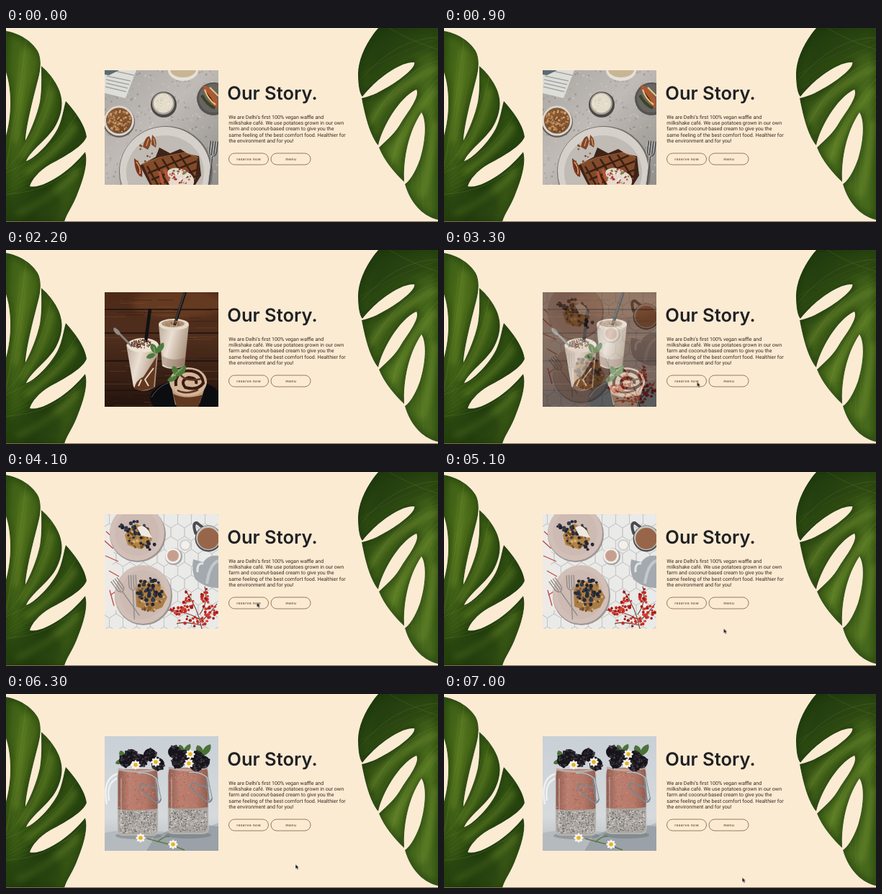
Write an HTML page that moves like this. It is 600 by 271 pixels and loops after 7100 ms.

```html
<!DOCTYPE html>
<html lang="en">
<head>
<meta charset="utf-8">
<title>Our Story</title>
<style>
html, body { margin: 0; width: 100%; height: 100%; overflow: hidden; background: #fcebd3; }
svg { display: block; width: 100vw; height: 100vh; }
text { text-rendering: geometricPrecision; }
.title { font: 600 25.5px Inter, sans-serif; fill: #1f2124; }
.copy { font: 7.1px Roboto, sans-serif; fill: #33291f; }
.btn rect { fill: none; stroke: #8c6f52; stroke-width: .9; }
.btn text { font: 600 5.1px Inter, sans-serif; letter-spacing: .3px; fill: #72583f; text-anchor: middle; }
.slide { opacity: 0; animation: 7.1s linear infinite both; }
#shakes { animation-name: fade1; }
#brunch { animation-name: fade2; }
#jars { animation-name: fade3; }
#cursor { animation: move 7.1s ease-in-out infinite both; }
@keyframes fade1 { 0%, 14.79% { opacity: 0 } 24.65%, 100% { opacity: 1 } }
@keyframes fade2 { 0%, 42.96% { opacity: 0 } 52.82%, 100% { opacity: 1 } }
@keyframes fade3 { 0%, 71.83% { opacity: 0 } 81.69%, 100% { opacity: 1 } }
@keyframes move {
  0%, 35.2% { transform: translate(372px, 275px) }
  43.6%, 46.5% { transform: translate(351.5px, 184.5px) }
  54%, 62% { transform: translate(348.5px, 182.5px) }
  74%, 81% { transform: translate(391.3px, 221.3px) }
  97%, 100% { transform: translate(414.2px, 256.4px) }
}
</style>
</head>
<body>
<svg viewBox="0 0 600 271" preserveAspectRatio="none">
<defs>
  <clipPath id="frame"><rect x="137" y="59" width="158" height="160"/></clipPath>
  <linearGradient id="greenL" x1="0" y1="0" x2=".7" y2="1">
    <stop offset="0" stop-color="#3d5f17"/><stop offset=".3" stop-color="#4a6b19"/>
    <stop offset=".6" stop-color="#365613"/><stop offset=".8" stop-color="#294710"/><stop offset="1" stop-color="#3d5c17"/>
  </linearGradient>
  <linearGradient id="greenR" x1=".2" y1="0" x2=".7" y2="1">
    <stop offset="0" stop-color="#233f10"/><stop offset=".3" stop-color="#365415"/>
    <stop offset=".6" stop-color="#4e701e"/><stop offset="1" stop-color="#47691d"/>
  </linearGradient>
  <linearGradient id="wood" x1="0" y1="0" x2="0" y2="1">
    <stop offset="0" stop-color="#4d2a18"/><stop offset=".4" stop-color="#4f2e1d"/><stop offset="1" stop-color="#25140e"/>
  </linearGradient>
  <linearGradient id="stone" x1="0" y1="0" x2="1" y2="1">
    <stop offset="0" stop-color="#aaa6a2"/><stop offset=".45" stop-color="#c0bbb6"/><stop offset="1" stop-color="#928e8a"/>
  </linearGradient>
  <linearGradient id="mist" x1="0" y1="0" x2="0" y2="1">
    <stop offset="0" stop-color="#c9d0d6"/><stop offset=".7" stop-color="#d6dadd"/><stop offset="1" stop-color="#b4b9be"/>
  </linearGradient>
  <linearGradient id="pink">
    <stop offset="0" stop-color="#8d5c50"/><stop offset=".3" stop-color="#bd8070"/><stop offset=".7" stop-color="#b57868"/><stop offset="1" stop-color="#925d50"/>
  </linearGradient>
  <linearGradient id="milk" x1="0" y1="0" x2="1" y2=".4">
    <stop offset="0" stop-color="#b9a999"/><stop offset=".45" stop-color="#ebe0d3"/><stop offset="1" stop-color="#a8917c"/>
  </linearGradient>
  <filter id="soft"><feGaussianBlur stdDeviation="4"/></filter>
  <path id="leafL" d="M0 4C18 7 36 18 44 32C50 43 48 58 45 70C40 90 28 135 27 157C34 144 43 122 47 103C50 86 49 68 49 53C62 64 75 82 77 98C79 110 76 124 68 138C58 155 35 170 28 186C40 182 62 160 72 140C78 128 80 112 83 102C95 115 110 135 112 152C108 164 85 178 62 190C45 200 36 212 33 221C45 224 62 214 76 205C90 195 100 185 110 173C115 190 106 215 98 235C92 250 84 260 81 271H0V150C7 125 9 90 0 62Z"/>
  <path id="leafR" d="M517 0C501 18 488 45 489 66C489 80 491 92 495 96C510 76 545 47 567 48C570 55 545 75 522 87C510 94 500 97 494 98C498 120 505 150 517 164C522 140 545 98 570 86C575 95 560 115 550 130C540 148 530 155 518 167C525 185 540 203 553 215C552 190 556 150 577 118C585 130 582 160 575 183C568 203 560 214 554 218C560 240 575 262 600 268V0Z"/>
  <clipPath id="clipL"><use href="#leafL"/></clipPath>
  <clipPath id="clipR"><use href="#leafR"/></clipPath>
  <path id="mint" d="M0 0C-6-3-9-9-5-13C1-12 3-6 0 0C0-8 4-13 10-14C12-8 8-2 0 0C-5-2-11 0-12 5C-7 8-2 5 0 0"/>
  <g id="daisy">
    <g fill="#f8f5ec">
      <ellipse rx="2.3" ry="6.8"/><ellipse rx="2.3" ry="6.8" transform="rotate(45)"/>
      <ellipse rx="2.3" ry="6.8" transform="rotate(90)"/><ellipse rx="2.3" ry="6.8" transform="rotate(135)"/>
    </g>
    <circle r="2.8" fill="#e5b423"/>
  </g>
  <g id="jar">
    <path d="M3 7Q1 13 1 20V91Q1 99 9 99H49Q57 99 57 91V20Q57 13 55 7Z" fill="url(#pink)"/>
    <path d="M1 63Q28 66 57 62V91Q57 99 49 99H9Q1 99 1 91Z" fill="#aaa5a0"/>
    <path d="M3 6Q0 13 1 22V91Q1 99 9 99H49Q57 99 57 91V22Q58 13 55 6" fill="none" stroke="#c9c9c6" stroke-width="1.4" opacity=".7"/>
    <path d="M2 7Q29 14 56 7" fill="none" stroke="#b9a9a2" stroke-width="3"/>
    <path d="M6 20V90" stroke="#fff" stroke-width="2" opacity=".25"/>
  </g>
  <path id="clip" d="M0 2Q14 0 25 9L31 38Q29 46 22 41L3 24Q0 19 5 16L26 23M23 7L27 41" fill="none" stroke="#7f858a" stroke-width="2"/>
  <path id="shine" d="M0 2Q14 0 25 9L31 38" fill="none" stroke="#e8eaeb" stroke-width=".8"/>
  <path id="fork" d="M-5-16V-2Q-5 4 0 5Q5 4 5-2V-16M-1.7-16V3M1.7-16V3M0 4V46" fill="none"/>
</defs>

<rect width="600" height="271" fill="#fcebd3"/>

<g clip-path="url(#clipL)">
  <use href="#leafL" fill="url(#greenL)"/>
  <use href="#leafL" fill="none" stroke="#172e09" stroke-width="7" opacity=".6" filter="url(#soft)"/>
  <g fill="none" stroke="#7f9c35" stroke-width="7" opacity=".45" filter="url(#soft)">
    <path d="M14 160Q20 90 27 30M22 182Q55 130 63 85M28 203Q80 165 96 135M15 260Q70 235 100 198"/>
  </g>
  <path d="M0 240Q50 200 70 230T60 275H0Z" fill="#1d360c" opacity=".4" filter="url(#soft)"/>
  <g id="veinsL" fill="none" stroke="#8fa64a" stroke-width=".6" opacity=".35">
    <path d="M0 195Q20 90 28 14M0 198Q50 145 63 67M0 202Q68 175 98 121M0 232Q65 230 110 180"/>
  </g>
</g>
<g clip-path="url(#clipR)">
  <use href="#leafR" fill="url(#greenR)"/>
  <use href="#leafR" fill="none" stroke="#172e09" stroke-width="7" opacity=".6" filter="url(#soft)"/>
  <g fill="none" stroke="#86a33b" stroke-width="7" opacity=".45" filter="url(#soft)">
    <path d="M600 55Q535 80 506 132M597 85Q555 130 537 185M595 130Q590 190 578 235"/>
  </g>
  <path d="M517 0L600 0V35Q545 30 500 70Z" fill="#1b330b" opacity=".35" filter="url(#soft)"/>
  <g id="veinsR" fill="none" stroke="#95ab52" stroke-width=".6" opacity=".3">
    <path d="M600 13Q540 15 493 72M600 45Q540 65 505 138M600 72Q550 120 535 193M532 0Q566 20 600 30"/>
  </g>
</g>

<g clip-path="url(#frame)">
  <g id="waffle">
    <rect x="137" y="59" width="158" height="160" fill="url(#stone)"/>
    <g id="specks" opacity=".4"></g>
    <path d="M137 59H181L166 98L137 91Z" fill="#deded9"/>
    <path d="M140 67L173 74M139 72L171 79M139 77L169 84M138 82L167 89M146 59L178 66" stroke="#a3a5a4" stroke-width="1.3"/>
    <path d="M137 59H157L143 66L137 65Z" fill="#5c6a72"/>
    <ellipse cx="246" cy="59" rx="21" ry="15" fill="#e5e1d9"/><ellipse cx="246" cy="58" rx="18" ry="11" fill="#c8b593"/>
    <circle cx="288" cy="99" r="23" fill="#555453"/><circle cx="288" cy="98" r="20" fill="#68645f"/>
    <path d="M273 80Q284 81 294 100V112Q278 102 273 80" fill="#b0582f"/>
    <path d="M276 86Q280 99 291 107M283 83L295 95" stroke="#e2c583" stroke-width="2.2"/>
    <path d="M272 94Q279 107 290 112" fill="none" stroke="#39442a" stroke-width="4"/>
    <circle cx="219" cy="107" r="18" fill="#4a4847"/><circle cx="218.5" cy="105.5" r="15.5" fill="#a9a296"/><circle cx="218.5" cy="105" r="13.5" fill="#e4dccb"/>
    <circle cx="157" cy="131" r="22" fill="#625d58"/><circle cx="157" cy="129.5" r="21" fill="#dad5cd"/><circle cx="157" cy="129.5" r="18" fill="#7d5433"/>
    <g id="nuts"></g>
    <ellipse cx="222" cy="201" rx="65" ry="64" fill="#716d69"/><ellipse cx="221" cy="200" rx="63" ry="62" fill="#d5d0c9"/>
    <ellipse cx="221" cy="202" rx="54" ry="52" fill="#c0bbb4"/>
    <g id="crumbs"></g>
    <path d="M186 192L208 180L213 167L228 175L242 169L253 176L268 179L271 206L263 219H200Z" fill="#3f2317"/>
    <path d="M190 190L213 182L248 175L266 181L263 211L244 219H203Z" fill="#824b2a"/>
    <path d="M196 193L211 219M206 187L225 219M217 183L240 219M229 179L251 215M241 177L262 209M197 203L257 178M202 212L265 186M214 218L265 198M233 219L264 207" stroke="#3b2015" stroke-width="2.5"/>
    <path d="M189 190L213 181L248 174L267 181" fill="none" stroke="#ad6d3c" stroke-width="1.2"/>
    <path d="M225 199Q234 192 249 199Q265 208 260 219H227Q222 207 225 199" fill="#e6d9cc"/>
    <g id="topping"></g>
    <path d="M178 182Q191 191 189 208Q179 206 178 182" fill="#7a3324"/><path d="M181 187Q187 195 186 204" stroke="#cf9350" stroke-width="2"/>
    <path d="M190 166Q193 152 199 151Q204 160 197 170M203 149Q211 156 208 167L202 163" fill="#83442a"/>
    <path d="M195 165L198 155M205 154L207 164" stroke="#cf9c58" stroke-width="1.4"/>
    <path d="M213 200L218 218M220 197L226 214" stroke="#b5563a" stroke-width="4"/>
    <use href="#fork" transform="translate(287 174) rotate(7)" stroke="#4c4d50" stroke-width="2.2"/>
    <use href="#fork" transform="translate(286 174) rotate(7)" stroke="#c9c7c2" stroke-width=".9"/>
  </g>

  <g id="shakes" class="slide">
    <rect x="137" y="59" width="158" height="160" fill="url(#wood)"/>
    <ellipse cx="240" cy="75" rx="65" ry="20" fill="#87512d" opacity=".4" filter="url(#soft)"/>
    <g id="grain"></g>
    <path d="M137 83H295M137 116H295M137 155H295M137 196H295" stroke="#1d100c" stroke-width="1.5"/>
    <ellipse cx="249" cy="207" rx="49" ry="26" fill="#0c0d10"/><path d="M202 206Q216 181 249 182" fill="none" stroke="#54565a"/>
    <path d="M212 104L217 162Q230 170 248 162L254 104Z" fill="url(#milk)"/>
    <path d="M213 115L217 160Q231 168 248 161L249 150Q233 157 217 148Z" fill="#816250" opacity=".4"/>
    <ellipse cx="233" cy="104" rx="21" ry="8" fill="#e5d9cb"/><ellipse cx="232" cy="103" rx="16" ry="5" fill="#b4977a"/>
    <path d="M249 59L234 105" stroke="#171719" stroke-width="4"/><path d="M248 60L234 103" stroke="#78716a" stroke-width=".7"/>
    <path d="M167 132L177 191Q190 202 207 191L212 132Z" fill="url(#milk)"/>
    <path d="M209 149Q198 166 191 177Q180 182 178 194Q190 199 205 192Z" fill="#633821"/>
    <path d="M205 165L193 181L198 190M188 181L184 190" fill="none" stroke="#e5d4bf" stroke-width="2"/>
    <ellipse cx="190" cy="133" rx="22" ry="10" fill="#ede2d4"/>
    <path d="M150 109L175 135" stroke="#85817b" stroke-width="3"/><ellipse cx="154" cy="114" rx="3" ry="6" transform="rotate(-43 154 114)" fill="#918c85"/>
    <path d="M200 82L194 129" stroke="#111113" stroke-width="4.5"/>
    <g id="cocoa"></g>
    <path d="M228 183L235 216Q253 223 269 214L279 184Z" fill="#bf9e7d"/>
    <path d="M232 201L237 219H267L273 202Q250 210 232 201" fill="#613720"/>
    <ellipse cx="253" cy="184" rx="26" ry="20" fill="#d3b698"/>
    <path d="M236 190Q234 173 249 169Q272 167 274 186Q266 197 249 192Q241 182 254 178Q266 179 264 187" fill="none" stroke="#3b1c13" stroke-width="4"/>
    <path d="M242 174Q250 185 271 180M238 196Q250 203 267 195" fill="none" stroke="#5d3421" stroke-width="2.5"/>
    <g fill="#4e7b3e"><use href="#mint" transform="translate(208 145) scale(1.1)"/><use href="#mint" transform="translate(238 177) scale(1.15)"/></g>
    <path d="M205 135L208 148M230 178L246 164" stroke="#86a667" stroke-width="1.3"/>
  </g>

  <g id="brunch" class="slide">
    <rect x="137" y="59" width="158" height="160" fill="#eaeae8"/>
    <g id="tiles" fill="none" stroke="#bfc0bf" stroke-width=".7"></g>
    <path d="M137 77L151 88L148 130L166 147L157 192L137 197Z" fill="#eeeae6"/>
    <path d="M139 83L151 94M137 96L149 107M138 117L156 125M143 138L157 146M145 172L158 163M150 187L144 165" stroke="#b84b48" stroke-width="1.3"/>
    <ellipse cx="183" cy="87" rx="39" ry="39" fill="#9d9694"/><ellipse cx="182" cy="85" rx="38" ry="39" fill="#d2c0b8"/><ellipse cx="182" cy="85" rx="31" ry="32" fill="#cdbab2"/>
    <ellipse cx="191" cy="173" rx="40" ry="41" fill="#9d9694"/><ellipse cx="190" cy="171" rx="39" ry="41" fill="#d2c0b8"/><ellipse cx="190" cy="171" rx="32" ry="34" fill="#cdbab2"/>
    <path d="M165 88L179 72L199 79L203 95L188 108L169 102Z" fill="#b08447"/>
    <path d="M180 165L188 150L214 158L224 175L217 189L202 195L181 188Z" fill="#a97d47"/>
    <g id="berries"></g>
    <path d="M182 78Q190 71 198 82L203 92L188 89Z" fill="#efe9e2"/>
    <circle cx="233" cy="118" r="12" fill="#a4a5a5"/><circle cx="232" cy="117" r="10.8" fill="#f2efec"/><circle cx="232" cy="117" r="8" fill="#c89f8e"/>
    <circle cx="249" cy="102" r="8" fill="#d0cfcd"/><circle cx="249" cy="102" r="6" fill="#f4f0e9"/>
    <path d="M264 87Q258 71 265 71L274 78" fill="none" stroke="#494b50" stroke-width="4"/>
    <circle cx="281" cy="93" r="18.5" fill="#4d5055"/><circle cx="281" cy="92" r="17" fill="#c9c4be"/><circle cx="281" cy="93" r="15" fill="#97664a"/>
    <path d="M263 150Q257 137 260 122L274 126Q281 115 295 117V162Q278 163 263 150" fill="#a3a9ae"/>
    <path d="M266 140Q265 126 274 128" fill="none" stroke="#e1e4e5" stroke-width="3"/>
    <path d="M279 156Q283 128 295 124" fill="none" stroke="#c3c8cb" stroke-width="4"/>
    <g stroke="#8d8985" stroke-width="1.3"><use href="#fork" transform="translate(176 160) rotate(-3)"/><use href="#fork" transform="translate(159 163) rotate(-35)"/></g>
    <path d="M272 219Q267 191 249 165M270 206Q247 193 225 193M271 214Q246 208 237 212M269 199Q282 181 276 160M272 208Q286 195 293 184" fill="none" stroke="#753f34" stroke-width="1.2"/>
    <g id="red"></g>
  </g>

  <g id="jars" class="slide">
    <rect x="137" y="59" width="158" height="160" fill="url(#mist)"/>
    <path d="M137 194Q175 186 214 192T295 180V219H137Z" fill="#b5babf"/>
    <path d="M207 199Q250 178 295 185V219H195Z" fill="#9aa1a8"/>
    <path d="M140 154Q133 116 157 111M143 149Q139 122 157 117" fill="none" stroke="#eef1f1" stroke-width="2.4"/>
    <ellipse cx="184" cy="198" rx="32" ry="5" fill="#60676c" opacity=".4"/><ellipse cx="253" cy="197" rx="32" ry="5" fill="#60676c" opacity=".4"/>
    <use href="#jar" x="154" y="98"/><use href="#jar" x="224" y="96"/>
    <g id="seeds"></g>
    <g fill="#4b7238"><use href="#mint" transform="translate(272 87) scale(1.2)"/><use href="#mint" transform="translate(164 92)"/><use href="#mint" transform="translate(246 84)"/></g>
    <g id="black"></g>
    <use href="#clip" x="184" y="109"/><use href="#shine" x="183.5" y="108.5"/>
    <use href="#clip" x="255" y="108"/><use href="#shine" x="254.5" y="107.5"/>
    <use href="#daisy" x="180" y="99"/><use href="#daisy" x="208" y="95"/><use href="#daisy" x="254" y="97"/><use href="#daisy" x="256" y="84"/>
    <path d="M196 202L230 211L248 218M210 207Q221 197 227 199" fill="none" stroke="#5e793f" stroke-width="1.5"/>
    <use href="#daisy" x="187" y="201"/><use href="#daisy" x="232" y="210"/>
  </g>
</g>

<text class="title" x="307.3" y="99.5">Our Story.</text>
<g class="copy">
  <text x="309.3" y="127">We are Delhi’s first 100% vegan waffle and</text>
  <text x="309.3" y="135.2">milkshake café. We use potatoes grown in our own</text>
  <text x="309.3" y="143.4">farm and coconut-based cream to give you the</text>
  <text x="309.3" y="151.6">same feeling of the best comfort food. Healthier for</text>
  <text x="309.3" y="159.8">the environment and for you!</text>
</g>
<g class="btn">
  <rect x="309.5" y="175" width="55" height="16" rx="8"/><text x="337.1" y="185">reserve now</text>
  <rect x="368" y="175" width="55" height="16" rx="8"/><text x="395.7" y="185">menu</text>
</g>
<rect y="270" width="600" height="1" fill="#806a55"/>
<path id="cursor" d="M0 0V6.3L1.5 5L2.6 7.4L3.8 6.8L2.8 4.6H4.7Z" fill="#111" stroke="#fff" stroke-width=".35"/>
</svg>
<script>
let seed = 7;
const rand = () => (seed = seed * 16807 % 2147483647) / 2147483647;
const add = (id, html) => document.getElementById(id).insertAdjacentHTML('beforeend', html);

// Fills an ellipse, or a box when asked, with small round dots.
function scatter(id, n, x, y, rx, ry, size, colors, box) {
  let out = '';
  for (let i = 0; i < n; i++) {
    const a = rand() * Math.PI * 2, d = Math.sqrt(rand());
    const px = x + rx * (box ? rand() * 2 - 1 : d * Math.cos(a));
    const py = y + ry * (box ? rand() * 2 - 1 : d * Math.sin(a));
    const r = size * (.7 + rand() * .5);
    out += `<circle cx="${px.toFixed(1)}" cy="${py.toFixed(1)}" r="${r.toFixed(2)}" fill="${colors[i % colors.length]}"/>`;
  }
  add(id, out);
}

scatter('specks', 320, 216, 139, 79, 80, 1.4, ['#77736f', '#dcd8d3', '#96908c', '#cdc8c2'], true);
scatter('nuts', 150, 157, 129.5, 16.5, 16.5, 1.5, ['#b68250', '#8b572f', '#cfa06a', '#74482a']);
scatter('nuts', 30, 218.5, 105, 12, 12, .8, ['#f3ead8', '#c9bea8']);
scatter('crumbs', 16, 196, 176, 16, 20, 1.3, ['#96663c', '#74482a']);
scatter('topping', 40, 242, 207, 16, 11, 1.5, ['#c44f49', '#f4e9df', '#738447', '#923b35']);
scatter('cocoa', 90, 188, 131, 14, 6, 1, ['#4d2b1c', '#7b5138']);
scatter('cocoa', 35, 232, 103, 13, 4, .8, ['#78543a', '#a47a54']);
scatter('berries', 45, 184, 90, 17, 16, 1.8, ['#6f4a26', '#d8b071', '#8b6032', '#252733']);
scatter('berries', 18, 183, 80, 16, 13, 2.3, ['#20232d', '#343a4b']);
scatter('berries', 7, 162, 76, 6, 7, 2.4, ['#20232d', '#343a4b']);
scatter('berries', 6, 195, 103, 12, 6, 2.3, ['#252733']);
scatter('berries', 45, 201, 174, 20, 21, 1.8, ['#6f4a26', '#d8b071', '#8b6032']);
scatter('berries', 48, 199, 166, 18, 20, 2.4, ['#20232d', '#343b4e', '#292c37']);
for (const [x, y, rx, ry] of [[253, 180, 7, 14], [239, 194, 14, 5], [277, 177, 6, 15], [258, 209, 22, 8], [284, 196, 9, 11]])
  scatter('red', 20, x, y, rx, ry, 1.9, ['#c42b24', '#a01b19', '#d53f30']);
for (const [x, y] of [[183, 179], [253, 177]])
  scatter('seeds', 380, x, y, 26, 15, .8, ['#dad6d0', '#817d7a', '#c5c0b9', '#63615f'], true);
for (const [x, y] of [[183, 137], [253, 135]])
  scatter('seeds', 140, x, y, 26, 26, .6, ['#8f584b', '#d09582'], true);
for (const [x, y] of [[166, 93], [174, 86], [187, 93], [200, 85], [211, 98], [234, 81], [239, 95], [247, 87], [265, 88], [274, 95], [264, 99]]) {
  add('black', `<circle cx="${x}" cy="${y}" r="9" fill="#17151b"/>`);
  scatter('black', 30, x, y, 9, 9, 1.5, ['#2d2831', '#17151b', '#463e47']);
}

let grain = '';
for (let i = 0; i < 65; i++) {
  const x = 130 + rand() * 140, y = 60 + rand() * 158;
  grain += `<path d="M${x} ${y}h${15 + rand() * 45}" stroke="${i % 2 ? '#895631' : '#180e0a'}" stroke-width="1" opacity=".35"/>`;
}
add('grain', grain);

let hex = '';
for (let row = 0; row < 10; row++)
  for (let col = 0; col < 10; col++)
    hex += `M${134 + col * 19 + row % 2 * 9.5} ${54 + row * 18}l9.5 6v12l-9.5 6l-9.5-6v-12z`;
add('tiles', `<path d="${hex}"/>`);

// Fine side veins running beside the main ones.
for (let i = 0; i < 12; i++) {
  add('veinsL', `<path d="M0 ${190 + i * 4}Q${12 + i * 6} ${130 + i * 7} ${20 + i * 8} ${30 + i * 15}" stroke-width=".35"/>`);
  add('veinsR', `<path d="M600 ${15 + i * 8}Q${538 + i * 3} ${35 + i * 11} ${492 + i * 8} ${65 + i * 17}" stroke-width=".35"/>`);
}
</script>
</body>
</html>
```
